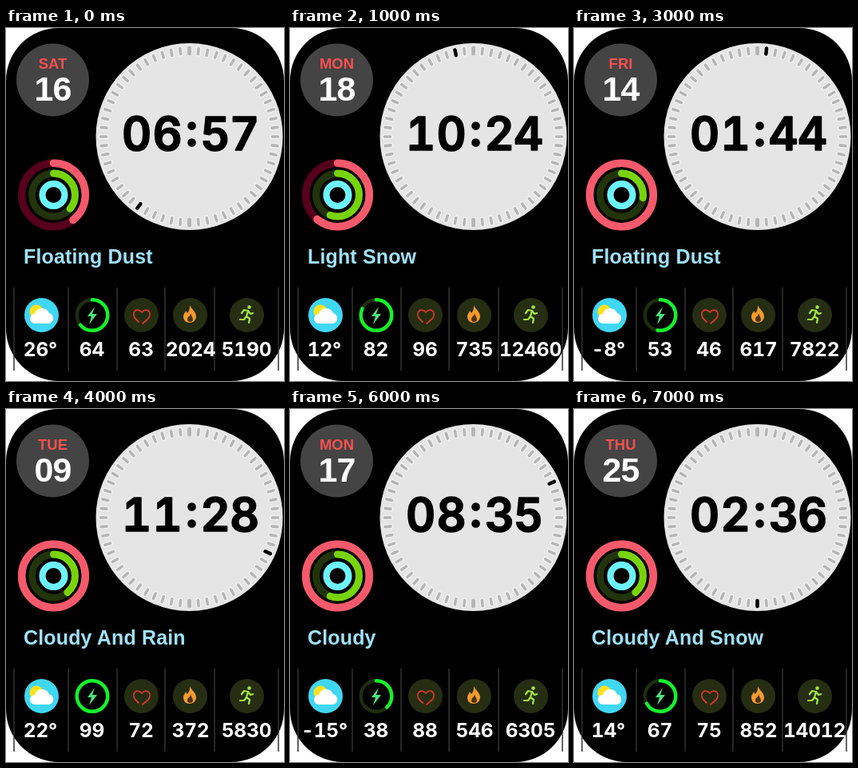
Write an HTML page that moves like this. It is 348 by 442 pixels and loops after 8000 ms.

```html
<!DOCTYPE html>
<html lang="en">
<head>
<meta charset="utf-8">
<style>
  html, body { margin: 0; width: 100%; height: 100%; overflow: hidden; background: #fff; }
  svg { display: block; }
  text { font: bold 25px "Liberation Sans", Arial, sans-serif; fill: #fff; text-anchor: middle; }
  #weekday { font-size: 18.5px; fill: #f7504e; }
  #day { font-size: 43px; letter-spacing: -1px; }
  #clock { font: 600 57.5px Inter, sans-serif; font-variant-numeric: tabular-nums;
           fill: #000; stroke: #000; stroke-width: 1.6; stroke-linejoin: round; }
  #weather { text-anchor: start; fill: #9ee2fb; letter-spacing: .15px; }
  .value { font: 700 24.5px Inter, sans-serif; font-variant-numeric: tabular-nums; letter-spacing: -.2px; }
  .line { fill: none; stroke-linecap: round; stroke-linejoin: round; }
</style>
</head>
<body>
<svg id="face" width="348" height="442" viewBox="0 0 348 442">
  <rect width="348" height="442" rx="66"/>
  <circle cx="58.5" cy="65" r="45.5" fill="#444"/>
  <text id="weekday" x="58.5" y="50.5"/>
  <text id="day" x="58.5" y="91"/>

  <circle cx="229.5" cy="136" r="117" fill="#e5e5e5"/>
  <g id="ticks" transform="translate(229.5 136)"></g>
  <text id="clock" x="163.5 202 232.5 262 298.5" y="153 153 147 153 153"/>

  <g id="rings"></g>
  <text id="weather" x="22" y="295"/>

  <path d="M10 325v104M78 325v104M139 325v104M199 325v104M261 325v104M341 325v104" stroke="#333" stroke-width="1.5"/>
  <g fill="#252e12">
    <circle cx="44.5" cy="359.5" r="21.5" fill="#40d7f4"/>
    <circle cx="169.5" cy="359.5" r="21.5"/>
    <circle cx="230.5" cy="359.5" r="21.5"/>
    <circle cx="301.5" cy="359.5" r="21.5"/>
  </g>
  <circle cx="38" cy="355" r="8.5" fill="#ffe21f"/>
  <path d="M36 370a6 6 0 0 1 0-12a9.5 9.5 0 0 1 18-1a6.7 6.7 0 0 1 0 13z" fill="#fff"/>
  <path d="M111 349l-9 12h5l-3 10l10-13h-6z" fill="#4be47d"/>
  <path class="line" d="M166 368l-4-4c-6-8 2-15 8-8c6-7 14 0 8 8l-7 6" stroke="#d83a28" stroke-width="1.8"/>
  <path d="M230 347c2 5 8 8 8 14c0 5-4 8-8 8c-5 0-8-3-8-8c0-3 2-4 3-7l2 3c3-3 3-6 3-10z" fill="#f59a2d"/>
  <path d="M231 357c0 4-4 4-4 8c0 4 7 4 7 0c0-3-2-4-3-8z" fill="#4a3411"/>
  <circle cx="304.5" cy="349.5" r="2.3" fill="#a6e63c"/>
  <path class="line" d="M295 357l3-4l5 1l-2 7l4 3l-1 5M301 361l-3 4h-5M303 354l3 4l3-1" stroke="#a6e63c" stroke-width="2.2"/>
</svg>
<script>
const STEP = 1000;
// weekday, day, time, second, red/green/cyan arcs in degrees, weather, values
const STATES = [
  ["SAT", "16", "06:57", 36, [142, 130, 360], "Floating Dust", ["26°", 64, 63, 2024, 5190]],
  ["MON", "18", "10:24", 58, [220, 200, 360], "Light Snow", ["12°", 82, 96, 735, 12460]],
  ["SUN", "26", "05:13", 0, [80, 308, 360], "Storm", ["18°", 63, 149, 1469, 1124]],
  ["FRI", "14", "01:44", 1, [360, 98, 360], "Floating Dust", ["-8°", 53, 46, 617, 7822]],
  ["TUE", "09", "11:28", 19, [360, 140, 360], "Cloudy And Rain", ["22°", 99, 72, 372, 5830]],
  ["WED", "22", "09:43", 44, [285, 255, 245], "Light Rain", ["-12°", 10, 124, 414, 9147]],
  ["MON", "17", "08:35", 11, [360, 200, 360], "Cloudy", ["-15°", 38, 88, 546, 6305]],
  ["THU", "25", "02:36", 30, [360, 140, 360], "Cloudy And Snow", ["14°", 67, 75, 852, 14012]]
];

const byId = id => document.getElementById(id);

function add(parent, tag, attrs) {
  const node = document.createElementNS("http://www.w3.org/2000/svg", tag);
  for (const key in attrs) node.setAttribute(key, attrs[key]);
  return parent.appendChild(node);
}

function ring(cx, cy, r, width, dark, bright) {
  const base = { cx, cy, r, fill: "none", "stroke-width": width };
  add(byId("rings"), "circle", { ...base, stroke: dark });
  const arc = add(byId("rings"), "circle", {
    ...base, stroke: bright, pathLength: 360, "stroke-linecap": "round", transform: `rotate(-90 ${cx} ${cy})`
  });
  return degrees => arc.setAttribute("stroke-dasharray", `${degrees} 360`);
}

const tick = (angle, stroke, width) => add(byId("ticks"), "path", {
  d: "M0-104V-111", stroke, "stroke-width": width, "stroke-linecap": "round", transform: `rotate(${angle})`
});

for (let i = 0; i < 60; i++) {
  tick(i * 6, "#f4f4f4", 6);
  tick(i * 6, "#b5b5b5", i % 30 ? 3.6 : 5);
}
const marker = tick(0, "#000", 4.5);

const activity = [
  ring(59.5, 209, 39.8, 9.6, "#56001c", "#f45a6b"),
  ring(59.5, 209, 27, 9, "#22340b", "#78d30b"),
  ring(59.5, 209, 14, 8, "#0b3b40", "#6df4fb")
];
const battery = ring(108, 359.5, 19.3, 4.4, "#1e2d10", "#12f32b");
const values = [43, 107.5, 169, 231, 301].map(x =>
  add(byId("face"), "text", { class: "value", x, y: 411 }));

let shown = -1;
function render(index) {
  const [weekday, day, time, second, arcs, weather, numbers] = STATES[index];
  const texts = { weekday, day, clock: time, weather };
  for (const id in texts) byId(id).textContent = texts[id];
  marker.setAttribute("transform", `rotate(${second * 6})`);
  activity.forEach((setArc, i) => setArc(arcs[i]));
  battery(numbers[1] * 3.6);
  values.forEach((node, i) => node.textContent = numbers[i]);
}

function loop() {
  const index = Math.floor(performance.now() / STEP) % STATES.length;
  if (index !== shown) render(shown = index);
  requestAnimationFrame(loop);
}
loop();
</script>
</body>
</html>
```
